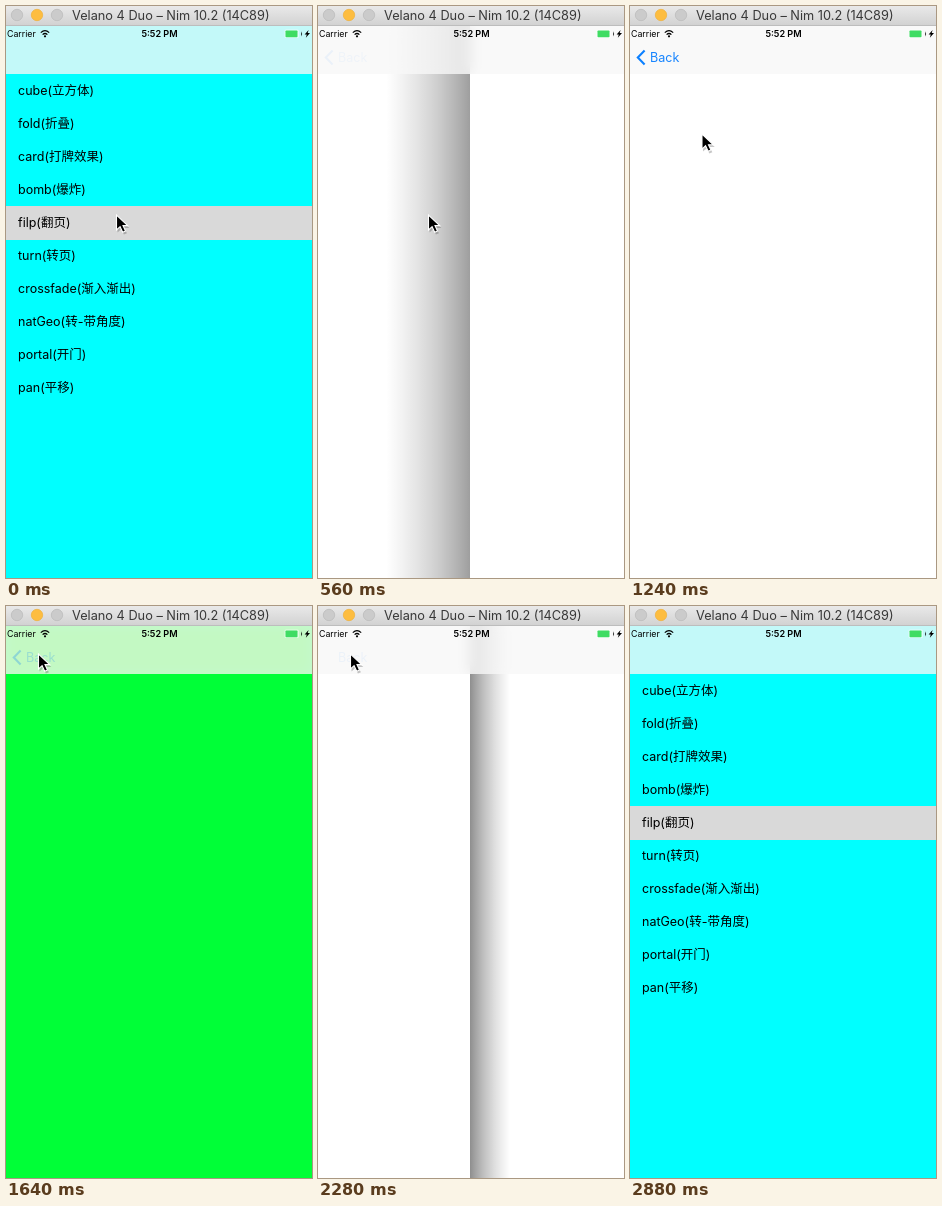
Recreate the animation shown at these times as an HTML page. Size 306x572 px, loop 2900 ms.

```html
<!DOCTYPE html>
<html lang="zh">
<head>
<meta charset="utf-8">
<title>Page flip</title>
<style>
html, body { margin: 0; width: 100%; height: 100%; overflow: hidden; background: #fff; }
#stage { position: relative; width: 306px; height: 572px; overflow: hidden; background: #fff;
  font-family: Inter, "Noto Sans CJK SC", "Noto Sans CJK", sans-serif; color: #000; }
#stage > * { position: absolute; }
.page { left: 0; top: 20px; width: 306px; height: 552px; }
#list { background: #00ffff; }
#rows { position: absolute; top: 48px; width: 100%; }
#rows div { height: 33px; line-height: 33px; padding-left: 12px; font-size: 12.5px; white-space: nowrap; }
#rows .on { height: 34px; margin-bottom: -1px; background: #d9d9d9; }
#detail { background: #00ff37; }
.flap { top: 20px; height: 552px; }
#left { left: 0; width: 152px; }
#right { left: 152px; width: 154px; }
#nav { left: 0; top: 20px; width: 306px; height: 48px; background: rgba(248,248,248,.79);
  backdrop-filter: blur(7px) saturate(1.8); }
svg { left: 0; top: 0; }
</style>
</head>
<body>
<div id="stage">
  <div id="list" class="page"><div id="rows"></div></div>
  <div id="detail" class="page"></div>
  <div id="left" class="flap"></div>
  <div id="right" class="flap"></div>
  <div id="nav"></div>
  <svg width="306" height="572" viewBox="0 0 306 572">
    <defs>
      <linearGradient id="bar" x1="0" y1="0" x2="0" y2="1">
        <stop offset="0" stop-color="#e9e9e9"/><stop offset="1" stop-color="#d1d1d1"/>
      </linearGradient>
    </defs>
    <rect width="306" height="20" fill="url(#bar)"/>
    <rect y="19" width="306" height="1" fill="#bdbdbd"/>
    <g stroke-width=".7">
      <circle cx="11" cy="9" r="5.7" fill="#cbcbcb" stroke="#b9b9b9"/>
      <circle cx="31" cy="9" r="5.7" fill="#fdbd40" stroke="#f0b03a"/>
      <circle cx="51" cy="9" r="5.7" fill="#cbcbcb" stroke="#b9b9b9"/>
    </g>
    <text x="66" y="14" font-size="12.75" fill="#383838">Velano 4 Duo – Nim 10.2 (14C89)</text>

    <text x="1" y="31" font-size="8.8">Carrier</text>
    <g fill="none" stroke="#000" stroke-width="1.2">
      <path d="M34.8 26.6Q39 22.8 43.2 26.6M36.6 28.6Q39 26.4 41.4 28.6"/>
    </g>
    <circle cx="39" cy="30.3" r="1.1"/>
    <text x="153.5" y="31" font-size="9.1" font-weight="600" text-anchor="middle">5:52 PM</text>
    <rect x="278.5" y="23.5" width="14.5" height="8.5" rx="1.5" fill="#fff" fill-opacity=".5"/>
    <rect x="279.5" y="24.5" width="12" height="6.8" rx=".8" fill="#3fdc63"/>
    <path d="M295.2 25.2q1.8 2.7 0 5.4z"/>
    <path d="M302.6 24l-4 4.4h2.2l-1 3.4 4.2-4.7h-2.3z"/>

    <path id="chevron" d="M14.6 44.6L7.8 51.6L14.6 58.6" fill="none" stroke="#007aff" stroke-width="2.1"/>
    <text id="back" x="20" y="56.3" font-size="12.6" fill="#007aff">Back</text>

    <g id="cursor">
      <path d="M1 2v15.5l3.8-3.4 2.6 5.4 3-1.3-2.6-5.3h5z" fill="#000" opacity=".22"/>
      <path d="M0 0v15l3.6-3.3 2.6 5.5 2.8-1.2-2.5-5.4h4.7z" stroke="#fff" stroke-width="1.1"/>
    </g>
  </svg>
</div>
<script>
const LOOP = 2900;
const PUSH = { start: 20, end: 1280 };
const POP = { start: 1684, end: 2806 };
const $ = id => document.getElementById(id);

$('rows').innerHTML = ['cube(立方体)', 'fold(折叠)', 'card(打牌效果)', 'bomb(爆炸)', 'filp(翻页)',
  'turn(转页)', 'crossfade(渐入渐出)', 'natGeo(转-带角度)', 'portal(开门)', 'pan(平移)']
  .map((name, i) => `<div class="${i === 4 ? 'on' : ''}">${name}</div>`).join('');

// Each track is a list of [time, value, value...] steps
const CURSOR = [[0, 110.5, 209], [1110, 110.5, 209], [1200, 88, 162], [1310, 45, 71], [1400, 32.5, 48],
  [2740, 32.5, 48], [2860, 6, -24], [LOOP, 6, -24]];
const BACK = [[0, 0], [300, 0], [560, .04], [740, .12], [900, .25], [1100, .6], [1280, 1], [1639, 1],
  [1640, .2], [1700, .6], [1880, .5], [2080, .22], [2280, .05], [2480, 0], [LOOP, 0]];
const CHEVRON = [[0, 0], [300, 0], [560, .06], [740, .2], [900, .45], [1100, .8], [1280, 1], [1639, 1],
  [1640, .27], [1880, .22], [2080, .08], [2280, 0], [LOOP, 0]];

function sample(track, t) {
  const i = Math.max(1, track.findIndex(step => step[0] > t));
  const a = track[i - 1], b = track[i];
  const f = (t - a[0]) / (b[0] - a[0]);
  return a.slice(1).map((v, n) => v + (b[n + 1] - v) * f);
}

// cubic-bezier(.42, 0, .58, 1)
function ease(x) {
  let lo = 0, hi = 1;
  for (let i = 0; i < 20; i++) {
    const s = (lo + hi) / 2, r = 1 - s;
    if (1.26 * s * r * r + 1.74 * s * s * r + s * s * s < x) lo = s; else hi = s;
  }
  return lo * lo * (3 - 2 * lo);
}

// Shadow of a half page turned toward the viewer by k quarter turns
function shade(k, side) {
  const c = Math.cos(k * Math.PI / 2), s = Math.sin(k * Math.PI / 2);
  const stops = [];
  for (let i = 0; i <= 16; i++) {
    const u = i / 16;
    const x = 153 * u * c / (1 - .35 * u * s);
    stops.push(`rgba(0,0,0,${(.5 * k * (1 - u)).toFixed(4)}) ${x.toFixed(2)}px`);
  }
  return `linear-gradient(to ${side}, ${stops.join()})`;
}

function draw(t) {
  const turn = [PUSH, POP].find(p => t >= p.start && t < p.end);
  const p = turn ? ease((t - turn.start) / (turn.end - turn.start)) : 0;
  $('list').style.display = t < PUSH.start || t >= POP.end ? '' : 'none';
  $('detail').style.display = t >= PUSH.end && t < POP.start ? '' : 'none';
  $('left').style.background = turn && p < .5 ? shade(2 * p, 'left') : 'none';
  $('right').style.background = turn && p >= .5 ? shade(2 - 2 * p, 'right') : 'none';
  $('back').style.opacity = sample(BACK, t)[0];
  $('chevron').style.opacity = sample(CHEVRON, t)[0];
  $('cursor').setAttribute('transform', `translate(${sample(CURSOR, t)})`);
}

function tick() {
  draw(performance.now() % LOOP);
  requestAnimationFrame(tick);
}
tick();
</script>
</body>
</html>
```
